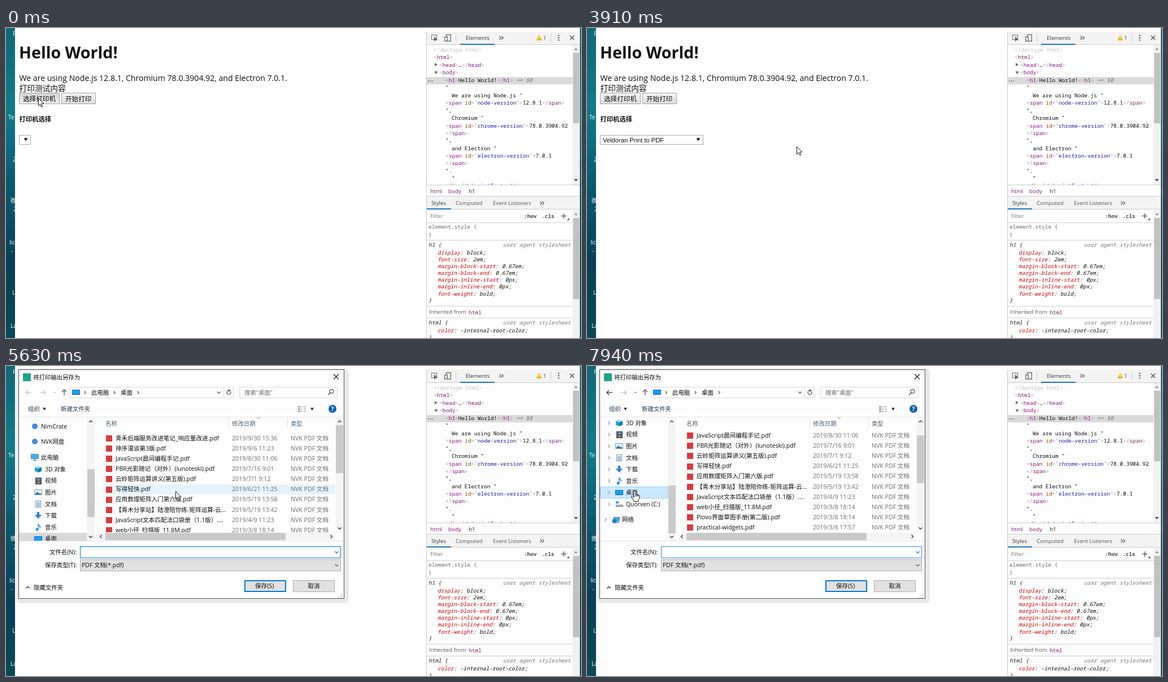
An HTML page with a canvas that plays this animation: 1018 by 550 pixels, repeating every 8000 ms.

```html
<!DOCTYPE html>
<html lang="zh">
<head>
<meta charset="utf-8">
<title>Print demo</title>
<style>
html, body { margin: 0; width: 100%; height: 100%; overflow: hidden; background: #fff; }
canvas { display: block; }
</style>
</head>
<body>
<canvas id="stage" width="1018" height="550"></canvas>
<script>
const ctx = document.getElementById('stage').getContext('2d');
const LOOP = 8000;
const UI = '"Open Sans", "Noto Sans CJK SC", "Noto Sans CJK", sans-serif';
const MONO = '"Noto Sans Mono", "DejaVu Sans Mono", monospace';
const ARIAL = '"Liberation Sans", Arial, sans-serif';
const BLUE = '#0078d7', INK = '#0c0c0c', GREY = '#6d6d6d';
const PUNCT = '#a894a6', TAG = '#881280', ATTR = '#994500', VALUE = '#1a1aa6', RED = '#c80000';

const clamp = (v, a, b) => Math.min(b, Math.max(a, v));

function rect(x, y, w, h, fill) {
  ctx.fillStyle = fill;
  ctx.fillRect(x, y, w, h);
}
function frame(x, y, w, h, color, lw = 1) {
  ctx.strokeStyle = color;
  ctx.lineWidth = lw;
  ctx.strokeRect(x + lw / 2, y + lw / 2, w - lw, h - lw);
}
function trace(pts, close) {
  ctx.beginPath();
  for (let i = 0; i < pts.length; i += 2) ctx.lineTo(pts[i], pts[i + 1]);
  if (close) ctx.closePath();
}
function line(pts, color, lw = 1) {
  trace(pts);
  ctx.strokeStyle = color;
  ctx.lineWidth = lw;
  ctx.stroke();
}
function poly(pts, fill) {
  trace(pts, true);
  ctx.fillStyle = fill;
  ctx.fill();
}
function disc(x, y, r, fill) {
  ctx.beginPath();
  ctx.arc(x, y, r, 0, 7);
  ctx.fillStyle = fill;
  ctx.fill();
}
// y is the middle of the capitals
function text(s, x, y, size, color = INK, style = '', family = UI) {
  ctx.font = `${style} ${size}px ${family}`;
  ctx.fillStyle = color;
  ctx.fillText(s, x, Math.round(y + size * 0.36));
  return x + ctx.measureText(s).width;
}
function clipped(x, y, w, h, draw) {
  ctx.save();
  ctx.beginPath();
  ctx.rect(x, y, w, h);
  ctx.clip();
  draw();
  ctx.restore();
}
// dir: 0 right, 1 down, 2 left, 3 up
function chevron(x, y, dir, color = '#404040', r = 3, lw = 1.4) {
  ctx.save();
  ctx.translate(x, y);
  ctx.rotate(dir * Math.PI / 2);
  line([-r / 2, -r, r / 2, 0, -r / 2, r], color, lw);
  ctx.restore();
}
function arrow(x, y, dir, color) {
  ctx.save();
  ctx.translate(x, y);
  ctx.rotate(dir * Math.PI / 2);
  line([-5, 0, 5, 0], color, 1.3);
  line([1, -4, 5, 0, 1, 4], color, 1.3);
  ctx.restore();
}
const down = (x, y, r, color = '#111') => poly([x - r, y - r * .7, x + r, y - r * .7, x, y + r], color);

// ---------- pointer ----------
// start, end, steps, points spread evenly over the time
const MOVES = [
  [150, 970, 7, [57, 124, 62, 134, 88, 162, 112, 190, 126, 201]],
  [1240, 2210, 8, [126, 201, 126, 210, 125, 222, 124, 233, 123, 241, 123, 241, 123, 230, 123, 204]],
  [2350, 3080, 6, [123, 196, 122, 176, 121, 152, 120, 136, 124, 130, 128, 127]],
  [3390, 3910, 5, [128, 127, 150, 140, 230, 175, 320, 202, 371, 210]],
  [5480, 6410, 8, [350, 214, 300, 222, 240, 228, 190, 230, 156, 229, 156, 233, 158, 240, 158, 244]],
  [6560, 7550, 8, [160, 250, 162, 257, 161, 258, 140, 250, 118, 240, 98, 232, 86, 226, 84, 227]]
];
function pointer(t) {
  if (t >= 7670) return { x: 84, y: 221 };
  let pos = { x: 57, y: 124 };
  for (const [a, b, n, pts] of MOVES) {
    if (t < a) break;
    const k = Math.min(n - 1, Math.floor((t - a + 20) / ((b - a) / (n - 1))));
    const u = k / (n - 1) * (pts.length / 2 - 1);
    const i = Math.min(Math.floor(u), pts.length / 2 - 2), f = u - i;
    const mix = j => pts[2 * i + j] + (pts[2 * i + 2 + j] - pts[2 * i + j]) * f;
    pos = { x: Math.round(mix(0)), y: Math.round(mix(1)) };
  }
  return pos;
}
function drawPointer(p, hand) {
  ctx.save();
  ctx.translate(p.x + .5, p.y + .5);
  ctx.lineJoin = 'round';
  if (hand) {
    trace([-1.5, 1, 0, 0, 1.5, 1, 1.5, 6, 4, 6.3, 6, 7, 8, 8, 8.5, 10, 8, 14, 6.5, 16, 6.5, 19,
      -1.5, 19, -2, 17, -6, 11, -5.5, 9.5, -4, 9.5, -1.5, 12], true);
  } else {
    trace([0, 0, 0, 13.4, 3, 10.6, 5.2, 15.4, 7.2, 14.5, 5.1, 9.8, 9.3, 9.5], true);
  }
  ctx.fillStyle = '#fff';
  ctx.fill();
  ctx.strokeStyle = '#111';
  ctx.lineWidth = 1;
  ctx.stroke();
  if (hand) [1.5, 4, 6].forEach(x => line([x, 6.5, x, 10], '#111'));
  ctx.restore();
}

// ---------- desktop edge ----------
function desktop() {
  const g = ctx.createLinearGradient(0, 0, 0, 550);
  ['#136878', '#107080', '#117c8a', '#0c6c80', '#0a5a70', '#0a4d66', '#093f58', '#094456', '#094a5a']
    .forEach((c, i) => g.addColorStop(i / 8, c));
  rect(0, 0, 1018, 550, g);
  clipped(0, 0, 16, 550, () => {
    [['P', 12, 10], ['Te', 4, 158], ['2', 12, 233], ['微', 8, 306], ['2', 13, 321], ['lic', 6, 380],
      ['-', 9, 395], ['L', 11, 469], ['La', 8, 528]].forEach(([s, x, y]) => text(s, x, y, 10, '#fff'));
  });
}

// ---------- page ----------
const PRINTERS = ['DayMoss', 'Veldoran XPS Document Writer', 'Veldoran Print to PDF', 'Fax'];

function button(x, w, label, pressed) {
  const g = ctx.createLinearGradient(0, 115, 0, 136);
  g.addColorStop(0, pressed ? '#d4d4d4' : '#f7f7f7');
  g.addColorStop(1, pressed ? '#f2f2f2' : '#dcdcdc');
  rect(x, 115, w, 20, g);
  frame(x, 115, w, 20, '#a0a0a0');
  text(label, x + 7, 125.5, 11.6);
}
function page(t, p, bg) {
  rect(16, 0, 1000, 550, bg);
  text('Hello World!', 23, 43.5, 28.7, '#111', 'bold');
  text('We are using Node.js 12.8.1, Chromium 78.0.3904.92, and Electron 7.0.1.', 23.5, 89, 14.1);
  text('打印测试内容', 23.5, 107, 13.7);
  button(23, 72, '选择打印机', t < 150);
  button(98, 61, '开始打印', t >= 3390 && t < 3520);
  text('打印机选择', 23.5, 162, 11.3, '#111', 'bold');

  const filled = t >= 287, open = t >= 1240 && t < 2060, w = filled ? 183 : 21;
  const ring = t >= 1240 && t < 3390;
  rect(23, 190, w, 17, '#fff');
  if (ring) frame(22, 189, w + 2, 19, '#f0c48a');
  frame(23, 190, w, 17, ring ? '#d98a1e' : '#a9a9a9');
  down(14 + w, 197.5, 3.3);
  if (filled) text(PRINTERS[t >= 2060 ? 2 : 0], 28, 198.5, 11.2, INK, '', ARIAL);
  if (!open) return;
  rect(23, 207, 183, 59, '#fff');
  const hot = clamp(Math.floor((p.y - 207) / 14.4), 0, 3);
  rect(24, 207 + hot * 14.4, 181, 14.4, '#1e90ff');
  PRINTERS.forEach((s, i) => text(s, 28, 214.3 + i * 14.3, 11.2, i === hot ? '#fff' : INK, '', ARIAL));
  frame(23, 207, 183, 59, '#a0a0a0');
}

// ---------- inspector ----------
function code(x, y, ...parts) {
  for (let i = 0; i < parts.length; i += 2) x = text(parts[i], x, y, 9.5, parts[i + 1], '', MONO);
  return x;
}
const tag = (x, y, name, slash = '') => code(x, y, '<' + slash, PUNCT, name, TAG, '>', PUNCT);
const span = (y, name, id, rest) =>
  code(778, y, '<', PUNCT, name, TAG, ' id', ATTR, '="', PUNCT, id, VALUE, '">', PUNCT, rest, INK);
const italic = (s, x, y, color) => text(s, x, y, 9.5, color, 'italic', MONO);
const rule = (name, value, y) => italic(`: ${value};`, italic(name, 764, y, RED), y, INK);

function scrollbar(top, thumb, h, end) {
  rect(1003, top, 13, end - top, '#f1f1f1');
  rect(1004, thumb, 11, h, '#c1c1c1');
  poly([1006, top + 9, 1012, top + 9, 1009, top + 5], '#909090');
}
function inspector(bg) {
  rect(744, 6, 272, 544, bg);
  rect(744, 6, 272, 23, '#f3f3f3');
  rect(744, 6, 1, 544, '#cacaca');
  rect(744, 29, 272, 1, '#ccc');
  // toolbar
  frame(753, 12, 10, 9, '#6e6e6e');
  poly([758, 15, 758, 24, 760.5, 21.5, 764, 21.5], '#555');
  frame(779, 11, 9, 13, '#6e6e6e', 1.4);
  rect(776, 15, 6, 9, '#f3f3f3');
  frame(776, 15, 6, 9, '#6e6e6e', 1.4);
  rect(796, 10, 1, 14, '#ccc');
  text('Elements', 814, 17.5, 9.8, '#333');
  rect(804, 28, 61, 2, '#1a73c8');
  chevron(875, 17.5, 0, '#555', 3, 1.2);
  chevron(879, 17.5, 0, '#555', 3, 1.2);
  poly([944, 12, 949, 22, 939, 22], '#f2b600');
  rect(943.4, 15, 1.2, 4, '#fff');
  text('1', 951, 17.5, 9.8, '#444');
  rect(964, 10, 1, 14, '#ccc');
  [13, 17.2, 21.4].forEach(y => disc(978.5, y, 1.2, '#555'));
  line([998.5, 13.5, 1006, 21], '#555', 1.4);
  line([1006, 13.5, 998.5, 21], '#555', 1.4);

  // element tree
  clipped(745, 30, 271, 248, () => {
    rect(745, 87, 258, 13, '#dadada');
    code(757, 39, '<!doctype html>', '#c0c0c0');
    tag(757, 52, 'html');
    poly([759, 62, 764, 65, 759, 68], '#6e6e6e');
    tag(code(tag(767, 66, 'head'), 66, '…', INK), 66, 'head', '/');
    down(761.5, 79, 3, '#6e6e6e');
    tag(767, 79, 'body');
    [748, 751.5, 755].forEach(x => disc(x, 94, 1, '#777'));
    const end = tag(code(tag(778, 93, 'h1'), 93, 'Hello World!', INK), 93, 'h1', '/');
    italic(' == $0', end, 93, '#777');
    [['"', 778, 106], ['We are using Node.js "', 789, 120], ['",', 778, 147], ['Chromium "', 789, 160],
      ['",', 778, 200], ['and Electron "', 789, 214], ['".', 778, 254], ['"', 789, 267]]
      .forEach(([s, x, y]) => code(x, y, s, INK));
    tag(span(133, 'span', 'node-version', '12.8.1'), 133, 'span', '/');
    span(174, 'span', 'chrome-version', '78.0.3904.92');
    tag(778, 187, 'span', '/');
    span(227, 'span', 'electron-version', '7.0.1');
    tag(778, 240, 'span', '/');
    span(280, 'div', 'printContent', '');
    scrollbar(30, 44, 125, 278);
    poly([1005.5, 268, 1012.5, 268, 1009, 272], '#444');
  });
  rect(745, 278, 271, 1, '#ccc');
  text('html', 751, 289, 9.8, TAG);
  text('body', 783, 289, 9.8, TAG);
  text('h1', 819, 289, 9.8, '#222');
  rect(745, 298, 271, 24, '#f3f3f3');
  rect(745, 298, 271, 1, '#ccc');
  rect(745, 321, 271, 1, '#ccc');
  text('Styles', 753, 310.5, 9.7, '#333');
  text('Computed', 796, 310.5, 9.7, '#555');
  text('Event Listeners', 862, 310.5, 9.6, '#555');
  chevron(947, 310.5, 0, '#555', 3, 1.2);
  chevron(951, 310.5, 0, '#555', 3, 1.2);
  rect(745, 320, 43, 2, '#1a73c8');

  // style rules
  text('Filter', 751, 334, 9.7, '#757575');
  text(':hov', 917, 333.5, 9.5, '#444', 'bold', MONO);
  text('.cls', 948, 333.5, 9.5, '#444', 'bold', MONO);
  line([983, 333.5, 992, 333.5], '#555', 1.4);
  line([987.5, 329, 987.5, 338], '#555', 1.4);
  poly([997, 337, 997, 341, 993, 341], '#555');
  [345, 376, 493, 514].forEach(y => rect(745, y, 258, 1, '#cfcfcf'));
  code(748, 353, 'element.style {', '#666');
  code(748, 367, '}', '#666');
  italic('h1 {', 748, 385, '#222');
  italic('user agent stylesheet', 880, 385, '#777');
  [['display', 'block'], ['font-size', '2em'], ['margin-block-start', '0.67em'], ['margin-block-end', '0.67em'],
    ['margin-inline-start', '0px'], ['margin-inline-end', '0px'], ['font-weight', 'bold']]
    .forEach(([name, value], i) => rule(name, value, 398.5 + i * 12.1));
  italic('}', 748, 483, '#222');
  text('Inherited from', 749, 504, 9.7, '#555');
  code(819, 504.5, 'html', TAG);
  italic('html {', 748, 523, '#222');
  italic('user agent stylesheet', 880, 523, '#777');
  rule('color', '-internal-root-color', 536.5);
  italic('}', 748, 549, '#222');
  scrollbar(323, 337, 144, 550);
}

// ---------- save dialog ----------
const FILES = [
  ['青禾后端服务改进笔记_响应量改进.pdf', '9/30 15:36'],
  ['排序漫谈第3版.pdf', '9/6 11:23'],
  ['JavaScript晨间编程手记.pdf', '8/30 11:06'],
  ['PBR光影随记（对外）(lunoteski).pdf', '7/16 9:01'],
  ['云岭矩阵运算讲义(第五版).pdf', '7/1 9:12'],
  ['写得轻快.pdf', '6/21 11:25'],
  ['应用数理矩阵入门第六版.pdf', '5/19 13:58'],
  ['【青木分享站】陆澄陪你练-矩阵运算-云...', '5/19 13:42'],
  ['JavaScript文本匹配法口袋册（1.1版）....', '4/9 11:23'],
  ['web小径_扫描版_11.8M.pdf', '3/8 18:14'],
  ['Plovo界面草图手册(第二版).pdf', '3/8 18:14'],
  ['practical-widgets.pdf', '3/8 17:57']
];
// label, icon, top level, icon present early
const PLACES = [
  ['NimCrate', 'blob', 1, 0], ['NVK网盘', 'blob', 1, 0], ['此电脑', 'pc', 1, 1], ['3D 对象', 'cube', 0, 0],
  ['视频', 'film', 0, 0], ['图片', 'picture', 0, 1], ['文档', 'page', 0, 1], ['下载', 'down', 0, 1],
  ['音乐', 'note', 0, 0], ['桌面', 'desk', 0, 1], ['Quorven (C:)', 'drive', 0, 0], ['网络', 'net', 1, 0]
];
const placeY = i => i < 3 ? 107 + i * 27.4 : i < 11 ? 183 + (i - 3) * 20.6 : 354.5;

const ICONS = {
  blob() { disc(7, 7, 5, '#3b8ee0'); },
  desk() { rect(0, 2, 14, 9, '#0b6fc4'); rect(1, 3, 12, 7, '#16a0f5'); rect(1, 10, 12, 1, '#0a4f90'); },
  pc() { rect(0, 1, 14, 9, '#6f8190'); rect(1, 2, 12, 7, '#35b4f0'); rect(6, 10, 2, 2, '#6f8190'); rect(3, 12, 8, 1, '#6f8190'); },
  cube() {
    poly([7, 1, 13, 3.5, 7, 6, 1, 3.5], '#8fe3f0');
    poly([1, 3.5, 7, 6, 7, 13, 1, 10.5], '#22a7c4');
    poly([13, 3.5, 7, 6, 7, 13, 13, 10.5], '#0b7fa5');
  },
  film() {
    rect(2, 1, 11, 12, '#34383c');
    rect(5, 2, 5, 5, '#5a9ad0');
    rect(5, 8, 5, 4, '#a5814f');
    for (let y = 2; y < 12; y += 2) { rect(3, y, 1, 1, '#ddd'); rect(11, y, 1, 1, '#ddd'); }
  },
  picture() { rect(0, 2, 14, 10, '#8a98a4'); rect(1, 3, 12, 8, '#e6f4ff'); poly([1, 11, 5, 6, 8, 9, 10, 8, 13, 11], '#2f78b7'); },
  page() { rect(2, 1, 10, 12, '#7b8b98'); rect(3, 2, 8, 10, '#fff'); for (let y = 4; y < 11; y += 2) rect(4, y, 6, 1, '#3f8fd2'); },
  down() { poly([5, 1, 9, 1, 9, 6, 13, 6, 7, 13, 1, 6, 5, 6], '#2a82da'); },
  note() { disc(5, 11, 2.4, '#1f8ae0'); rect(6.4, 1, 1.4, 10, '#1f8ae0'); line([7, 1, 8.5, 4, 10.5, 5.5, 10, 8], '#1f8ae0', 1.4); },
  drive() { rect(1, 2, 5, 4, '#2aa5ea'); rect(1, 8, 13, 4, '#8b959d'); rect(2, 9, 11, 1, '#cfd6da'); rect(10, 10, 2, 1, '#3ad04e'); },
  net() { rect(3, 2, 11, 7, '#4e7fa3'); rect(4, 3, 9, 5, '#3cb1f0'); disc(4.5, 9, 4, '#1d7fc9'); rect(8, 10, 5, 2, '#6f8190'); }
};
function icon(kind, x, y) {
  ctx.save();
  ctx.translate(x, Math.round(y));
  ICONS[kind]();
  ctx.restore();
}

function placesPane(t, p) {
  const scroll = t < 6120 ? 0 : t < 6850 ? clamp((p.y - 231) * 3, 0, 82) : 82;
  const inside = t > 5000 && p.x < 172;
  clipped(23, 91, 134, 219, () => {
    PLACES.forEach(([label, kind, top, early], i) => {
      const y = placeY(i) - scroll, x = top ? 44 : 50, row = Math.round(y - 10.3);
      const hot = inside && p.x < 143 && Math.abs(p.y + 1 - y) < 10.3;
      const chosen = label === '桌面';
      if (hot || chosen) rect(23, row, 120, 21, !hot ? '#d9d9d9' : chosen ? '#cce8ff' : '#e5f3ff');
      if (hot && chosen) frame(23, row, 120, 21, '#99d1ff');
      if (early || t >= 5210) icon(kind, x, y - 7);
      if (inside && label !== 'NimCrate') chevron(top ? 33 : 39, y, i === 2 ? 1 : 0, i === 2 ? '#444' : '#999', 3, 1.2);
      text(label, top ? 62 : 69, y, 10.4);
    });
    rect(143, 91, 14, 219, '#f4f4f4');
    chevron(150, 98.5, 3);
    chevron(150, 303, 1);
    rect(144, Math.round(183 + scroll * .35), 13, 85, inside && t > 6000 && t < 6850 ? '#bcbcbc' : '#c9c9c9');
  });
}
function filesPane(t, p) {
  const late = t >= 7940, shift = late ? 41 : 0;
  clipped(165, 113, 419, 182, () => FILES.forEach(([name, date], i) => {
    const y = 128 + i * 18.1 - shift;
    if (p.x > 175 && Math.abs(p.y - y + .5) < 9.05) rect(172, Math.round(y - 9), 411, 18, '#e5f3ff');
    rect(177, Math.round(y) - 5, 11, 11, '#d83b3b');
    text(name, 194, y, 10.6);
    text('2019/' + date, 400, y, 10.7, GREY);
    text('NVK PDF 文档', 504, y, 10.6, GREY);
  }));
  rect(584, 91, 13, 204, '#f4f4f4');
  chevron(590.5, 98.5, 3);
  chevron(590.5, 288, 1);
  rect(584, late ? 123 : 105, 13, 85, '#c9c9c9');
}
function headers(y) {
  text('名称', 176, y, 10.3, '#4c607a');
  text('修改日期', 400, y, 10.4, '#4c607a');
  text('类型', 504, y, 10.3, '#4c607a');
  rect(394, 91, 1, 21, '#e0e0e0');
  rect(498, 91, 1, 21, '#e0e0e0');
  chevron(446.5, 92, 1, '#777', 2.5, 1);
}
function hScroll(w, right) {
  rect(162, 296, right - 155, 13, '#f4f4f4');
  chevron(168, 302.5, 2);
  chevron(right, 302.5, 0);
  rect(176, 296, w, 13, '#c9c9c9');
}
function controls(t) {
  const late = t >= 7940;
  arrow(40, 47, 2, late ? '#333' : '#c4c4c4');
  arrow(65, 47, 0, '#c4c4c4');
  chevron(86, 47, 1, late ? '#555' : '#aaa', 2, 1);
  arrow(103, 47, 3, '#555');
  frame(113, 37, 290, 20, '#d9d9d9');
  rect(385, 38, 1, 18, '#d9d9d9');
  icon('desk', 117, 40);
  [140, 192, 234].forEach(x => {
    if (x < 200 || t >= 5210) chevron(x, 47, 0, '#555', 2.5, 1.1);
  });
  text('此电脑', 151, 47, 10.4);
  text('桌面', 203, 47, 10.4);
  chevron(377, 47, 1, '#555', 3, 1.2);
  ctx.beginPath();
  ctx.arc(394.5, 47, 3.6, -.6, 4.6);
  ctx.strokeStyle = '#555';
  ctx.lineWidth = 1.2;
  ctx.stroke();
  poly([394, 41, 398, 43.5, 394, 46], '#555');
  frame(413, 37, 174, 20, '#d9d9d9');
  text('搜索"桌面"', 422, 47, 10.4, '#6d6d6d');
  ctx.beginPath();
  ctx.arc(576.5, 45, 3.4, 0, 7);
  ctx.strokeStyle = '#555';
  ctx.lineWidth = 1.2;
  ctx.stroke();
  line([574, 47.5, 570, 51.5], '#555', 1.5);

  text('组织', 39, 76, 10.4, '#1e395b');
  down(68, 76, 3, '#1e395b');
  text('新建文件夹', 97, 76, 10.4, '#1e395b');
  for (let i = 0; i < 3; i++) {
    rect(517, 71 + i * 4, 4, 3, '#a9a9a9');
    rect(522, 72 + i * 4, 3, 1, '#888');
    rect(527, 72 + i * 4, 4, 1, '#888');
  }
  down(542, 76, 3, '#1e395b');
  disc(578, 76, 7, '#0a62b4');
  text('?', 575.4, 76, 10.5, '#fff', 'bold');
  rect(23, 90, 574, 1, '#e6e6e6');
  rect(23, 310, 574, 1, '#e3e3e3');

  text('文件名(N):', 77, 330.5, 10.4);
  rect(131, 320, 462, 21, '#fff');
  frame(131, 320, 462, 21, late ? '#2f8cda' : BLUE);
  chevron(585.5, 330.5, 1, '#555', 3, 1.1);
  // caret blinks every 530 ms
  if (Math.floor((t - 4900) / 530) % 2 === 0) rect(134, 323, 1, 14, '#000');
  text('保存类型(T):', 69, 353.5, 10.4);
  rect(131, 343, 462, 21, '#e1e1e1');
  frame(131, 343, 462, 21, '#adadad');
  text('PDF 文档(*.pdf)', 134, 353.5, 10.5);
  chevron(585.5, 353.5, 1, '#555', 3, 1.1);
  chevron(38.5, 393, 3, '#333', 3.2, 1.4);
  text('隐藏文件夹', 49, 393, 10.4);
  rect(422, 380, 74, 21, '#e1e1e1');
  frame(422, 380, 74, 21, BLUE, 2);
  text('保存(S)', 441, 390.5, 10.6);
  rect(508, 380, 74, 21, '#e1e1e1');
  frame(508, 380, 74, 21, '#adadad');
  text('取消', 534.5, 390.5, 10.4);
  for (let i = 0; i < 3; i++) for (let j = 0; j <= i; j++) rect(594 - j * 3, 404 + i * 3, 1.5, 1.5, '#b5b5b5');
}
function dialog(t, p) {
  ctx.beginPath();
  ctx.roundRect(18, 4, 589, 417, 8);
  ctx.fillStyle = '#e9e9e9';
  ctx.fill();
  rect(22, 6, 577, 407, '#fdfdfd');
  frame(22, 6, 577, 407, '#4d4d4d');
  rect(30, 13, 14, 14, '#1fa38f');
  text('将打印输出另存为', 48, 20, 10.4);
  line([580, 14.5, 589, 23.5], '#222', 1.2);
  line([589, 14.5, 580, 23.5], '#222', 1.2);
  if (t < 4570) return;
  if (t < 4700) {
    rect(23, 124, 135, 20, '#d9d9d9');
    text('快速访问', 62, 106, 10.4);
    text('此电脑', 62, 134, 10.4);
    headers(101);
    text('正在处理...', 355, 133, 10.4, GREY);
    hScroll(343, 590);
    return;
  }
  controls(t);
  headers(102);
  placesPane(t, p);
  if (t >= 4830) filesPane(t, p);
  else text('正在处理...', 355, 133, 10.4, GREY);
  hScroll(319, 576);
}

function draw(t) {
  const p = pointer(t), saving = t >= 4310, bg = saving ? '#fdfdfd' : '#fff';
  desktop();
  page(t, p, bg);
  // the dialog hides everything of the page below it
  inspector(bg);
  if (saving) dialog(t, p);
  drawPointer(p, t > 6850 && p.x < 143);
}
const start = performance.now();
function tick() {
  draw((performance.now() - start) % LOOP);
  requestAnimationFrame(tick);
}
tick();
</script>
</body>
</html>
```
